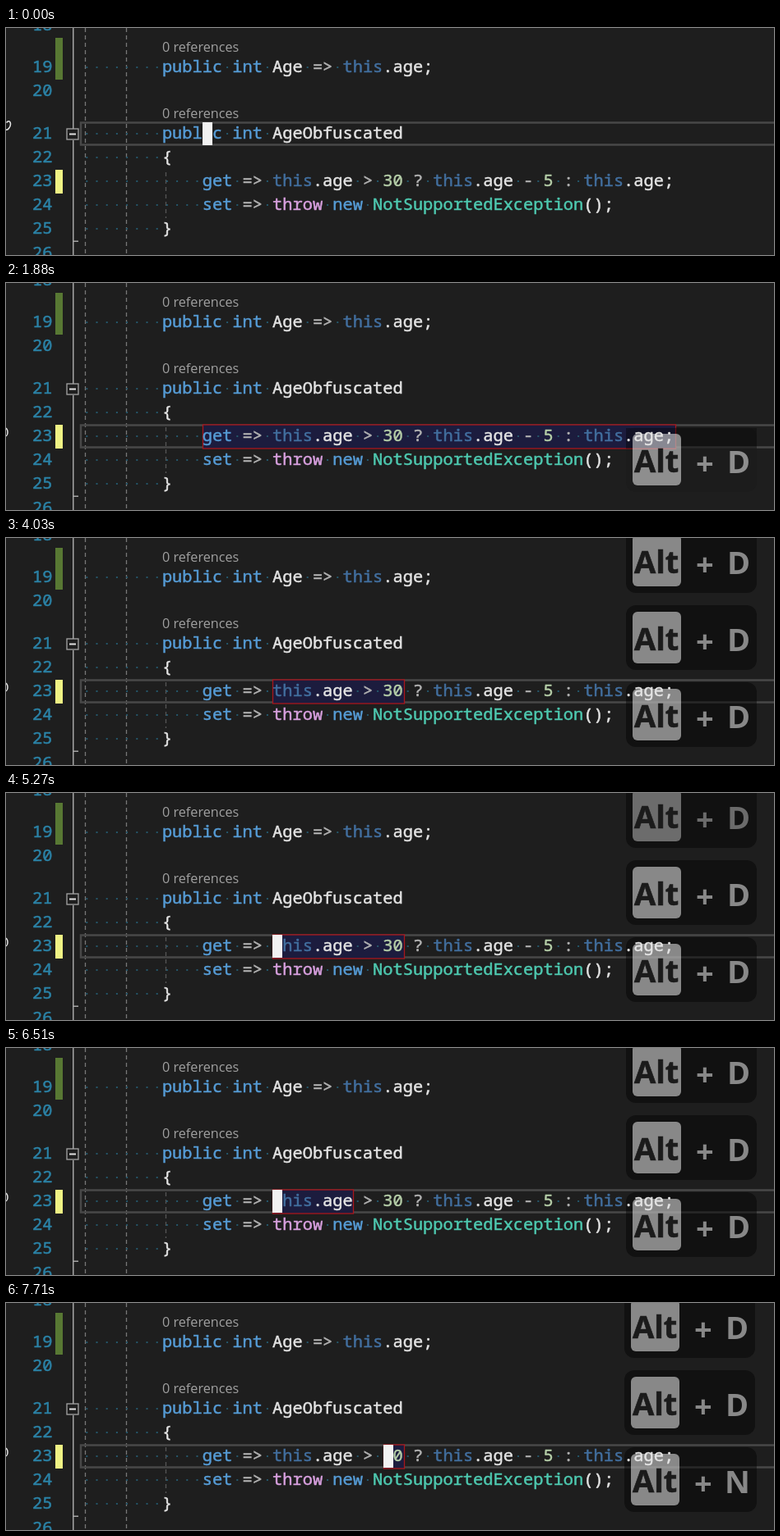
An HTML page with a canvas that plays this animation: 934x277 px, repeating every 8000 ms.

```html
<!DOCTYPE html>
<html lang="en">
<head>
<meta charset="utf-8">
<style>
html, body { margin: 0; width: 934px; height: 277px; overflow: hidden; background: #1e1e1e; }
canvas { display: block; }
</style>
</head>
<body>
<canvas id="stage" width="934" height="277"></canvas>
<script>
const ctx = document.getElementById('stage').getContext('2d');
const LOOP = 8000, CHAR = 12.2, LEFT = 92.3;
const MONO = '20.33px "Noto Sans Mono", monospace';
const BOLD = 'bold 38px "Open Sans", sans-serif';
const LABEL = '16.2px "Open Sans", sans-serif';

const code = {
  19: '        public int Age => this.age;',
  21: '        public int AgeObfuscated',
  22: '        {',
  23: '            get => this.age > 30 ? this.age - 5 : this.age;',
  24: '            set => throw new NotSupportedException();',
  25: '        }'
};
const tokens = [
  [/^(public|int|get|set|new)$/, '#569cd6'],
  [/^this$/, '#426f9f'],
  [/^throw$/, '#d8a0df'],
  [/^NotSupported/, '#4ec9b0'],
  [/^\d/, '#b5cea8'],
  [/^(=>|[>?:-])$/, '#b4b4b4']
];

// Caret visibility flips at each of these times.
const blinks = [860, 1450, 1880, 2150, 2670, 3230, 3780, 4180, 4740, 5270, 5830, 6360, 6910, 7460];
// Selection: start time, left, right.
const selections = [[430, 239, 815], [2150, 324, 803], [4030, 324, 485], [6510, 324, 423], [7710, 459, 485]];

const baseline = n => n === 18 ? 3 : Math.round(n < 21 ? 54 + (n - 19) * 29.3 : 135 + (n - 21) * 29.1);
const within = (t, a, b) => t >= a && t < b;

function rect(x, y, w, h, color) {
  ctx.fillStyle = color;
  ctx.fillRect(x, y, w, h);
}

function text(str, x, y, font, color, weight = 0) {
  ctx.font = font;
  ctx.fillStyle = ctx.strokeStyle = color;
  ctx.fillText(str, x, y);
  if (weight) {
    ctx.lineWidth = weight;
    ctx.strokeText(str, x, y);
  }
}

function round(x, y, w, h, r, color) {
  ctx.fillStyle = color;
  ctx.beginPath();
  ctx.roundRect(x, y, w, h, r);
  ctx.fill();
}

function frame(x, y, w, h, width, color) {
  ctx.strokeStyle = color;
  ctx.lineWidth = width;
  ctx.strokeRect(x, y, w, h);
}

function guide(x, top, bottom, color) {
  ctx.setLineDash([5, 4]);
  ctx.strokeStyle = color;
  ctx.lineWidth = 1.3;
  ctx.beginPath();
  ctx.moveTo(x, top);
  ctx.lineTo(x, bottom);
  ctx.stroke();
  ctx.setLineDash([]);
}

function drawMargin() {
  for (let n = 18; n <= 26; n++) text(n, 32, baseline(n), MONO, '#2b82a6', 0.5);
  rect(60, 12, 9, 51, '#587833');
  rect(60, 173, 9, 29, '#eff284');
  rect(81, 0, 1.5, 277, '#a5a5a5');
  rect(82, 259.5, 6, 1.5, '#a5a5a5');
  rect(74, 123, 14, 14, '#1e1e1e');
  frame(74, 123, 14, 13, 1.3, '#a5a5a5');
  rect(77, 128.5, 8, 2, '#e0e0e0');
  guide(96.5, 0, 277, '#777');
  guide(146.5, 0, 277, '#777');
  guide(194.5, 176, 232, '#555');
}

function drawLine(n) {
  const y = baseline(n), line = code[n];
  for (const { 0: word, index } of line.matchAll(/\w+|=>|\s|[^\w\s]/g)) {
    const x = LEFT + index * CHAR;
    if (word === ' ') {
      rect(x + 5, y - 7, 2, 2, '#24566a');
    } else {
      const hit = tokens.find(([rule]) => rule.test(word));
      text(word, x, y, MONO, hit ? hit[1] : '#e4e4e4', 0.5);
    }
  }
}

function drawPointer(t) {
  if (within(t, 430, 860)) return;
  const early = t < 430;
  ctx.strokeStyle = '#e8e8e8';
  ctx.lineWidth = 1.5;
  ctx.beginPath();
  if (early) ctx.ellipse(2, 119, 3, 5.5, 0.35, -2.6, 2.6);
  else ctx.ellipse(-1, 182, 3, 5, 0, -1.6, 1.6);
  ctx.stroke();
}

function drawKeys(y, letter, dx, strength, shade) {
  const x = 754 + dx;
  round(x, y, letter === 'N' ? 161 : 159, 79, 12, `rgba(0,0,0,${shade})`);
  const ink = `rgba(255,255,255,${strength})`;
  round(x + 8, y + 8, 59, 63, 6, ink);
  text('Alt', x + 10, y + 55, BOLD, '#1b1b1b', 0.6);
  text('+', x + 85, y + 58, BOLD, ink);
  text(letter, x + (letter === 'N' ? 122 : 123), y + 56, BOLD, ink);
}

function drawOverlay(t) {
  if (t < 430) return;
  const last = t >= 7710, dx = last ? -2 : 0;
  if (within(t, 4030, 5420) || within(t, 6510, 7180) || last) {
    const fading = within(t, 5270, 5420) || within(t, 7060, 7180);
    drawKeys(-12, 'D', dx, fading ? 0.38 : 0.5, 0.45);
  }
  if (t >= 2150) drawKeys(82, 'D', dx, 0.5, within(t, 5420, 6510) ? 0.1 : 0.45);
  if (t < 2150) rect(754, 177, 159, 25, 'rgba(0,0,0,.35)');
  drawKeys(176, last ? 'N' : 'D', dx, 0.5, t < 2150 ? 0.08 : 0.45);
}

function draw(t) {
  rect(0, 0, 934, 277, '#1e1e1e');
  drawMargin();
  const selection = selections.findLast(s => t >= s[0]);
  frame(91, selection ? 173.5 : 115.5, 850, 27, 2.5, '#484848');
  if (selection) {
    const [, left, right] = selection;
    rect(left, 173, right - left, 29, '#1c1c3e');
    frame(left + 0.5, 173, right - left - 1, 29, 1.3, '#a8161c');
  }
  // The code stays readable on top of the key caps.
  drawOverlay(t);
  for (const y of [29, 110]) text('0 references', 190, y, LABEL, '#a0a0a0');
  Object.keys(code).forEach(n => drawLine(+n));
  if (blinks.filter(b => t >= b).length % 2 === 0) {
    rect(selection ? selection[1] : 239, selection ? 173 : 115, 12, 28, '#f2f2f2');
  }
  if (within(t, 150, 580)) {
    rect(250, 75, 16, 17, '#353535');
    text('2', 255, 87, '10px "Open Sans", sans-serif', '#777');
  }
  drawPointer(t);
}

const start = performance.now();
function tick() {
  draw((performance.now() - start) % LOOP);
  requestAnimationFrame(tick);
}
tick();
</script>
</body>
</html>
```
